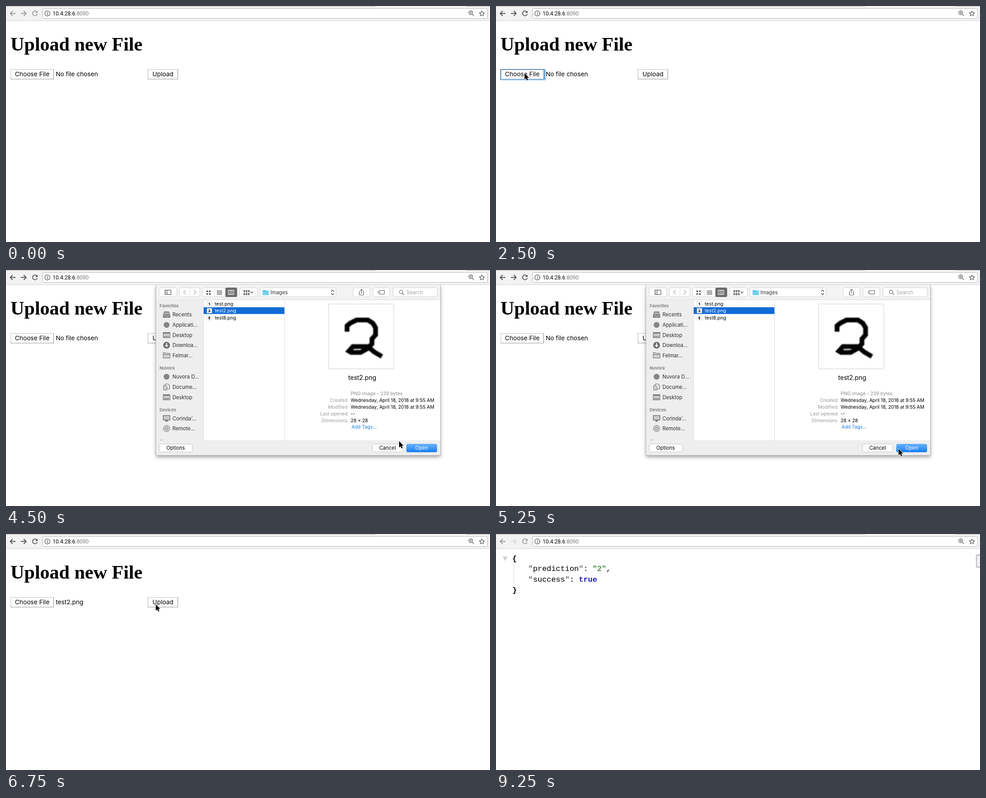
Animation, 1070 px wide and 524 px high, one loop 9.5 s. Source, as an HTML page:

```html
<!DOCTYPE html>
<html lang="en">
<head>
<meta charset="utf-8">
<title>File upload</title>
<style>
html, body { margin: 0; width: 100%; height: 100%; overflow: hidden; background: #fff; }
svg { display: block; width: 100%; height: 100%; }
text { font-family: Inter, sans-serif; white-space: pre; }
.serif { font-family: "Liberation Serif", serif; font-weight: 700; }
.url { font-family: Roboto, sans-serif; }
.mono { font-family: "Liberation Mono", monospace; }
.bold { font-weight: 700; }
</style>
</head>
<body>
<svg id="stage" viewBox="0 0 1070 524"></svg>
<script>
const LOOP = 9500, STEP = 250;

const rect = (x, y, w, h, fill, more = '') =>
  `<rect x="${x}" y="${y}" width="${w}" height="${h}" fill="${fill}" ${more}/>`;
const text = (x, y, s, size, more = '') =>
  `<text x="${x}" y="${y}" font-size="${size}" ${more}>${s}</text>`;
const line = (d, color, width = 1, more = '') =>
  `<path d="${d}" fill="none" stroke="${color}" stroke-width="${width}" ${more}/>`;
const shape = (d, fill, more = '') => `<path d="${d}" fill="${fill}" ${more}/>`;
const disc = (x, y, r, fill, more = '') => `<circle cx="${x}" cy="${y}" r="${r}" fill="${fill}" ${more}/>`;
const group = (id, body, more = '') => `<g id="${id}" ${more}>${body}</g>`;
const gray = c => `fill="${c}"`;
const end = 'text-anchor="end"', mid = 'text-anchor="middle"';

// Square web form button with a two pixel bevel
const webButton = (x, w, label) =>
  rect(x, 140, w, 23, '#a9a9a9') + rect(x, 140, w - 1, 22, '#d2d2d2') +
  rect(x + 1.5, 141.5, w - 3.5, 20, '#fff') + text(x + w / 2, 156.3, label, 13.7, mid);

const page = () =>
  text(10, 99, 'Upload new File', 42, 'class="serif"') +
  webButton(10, 96, 'Choose File') +
  group('ring',
    rect(9.5, 140, 100.5, 25, '#92c0f3', 'rx="1"') + rect(11.5, 142, 94, 20, '#fff') +
    `<path id="bevel" d="M10.5 163V140.8H106V162" fill="none" stroke-width="1.6"/>` +
    line('M11 162.4H106', '#6c8db5', .8) + text(58, 156.3, 'Choose File', 13.7, mid)) +
  `<text id="chosen" x="110" y="156.3" font-size="13.7"></text>` +
  webButton(313.5, 67, 'Upload');

const json = () => {
  const q = s => `<tspan fill="#444">"</tspan>${s}<tspan fill="#444">"</tspan>`;
  const row = (x, y, s, more = '') => text(x, y, s, 16.9, `class="mono ${more}"`);
  return shape('M14.5 50H25.5L20 60Z', '#d0d0d0') +
    row(36, 59.5, '{', 'bold') + row(36, 129.7, '}', 'bold') +
    line('M39.5 65V112', '#aaa', 1, 'stroke-dasharray="1.5 1.5"') +
    row(71.5, 82.3, q('prediction') + ': <tspan fill="#0b650b">"2"</tspan>,') +
    row(71.5, 106, q('success') + ': <tspan class="bold" fill="#1a1abd">true</tspan>') +
    rect(1062, 46.5, 14, 27, '#f0f0f0', 'rx="2" stroke="#999" stroke-width="1.3"');
};

const bar = () =>
  rect(0, 0, 1070, 33, '#f3f3f3') + rect(0, 32, 1070, 1, '#d4d4d4') +
  rect(0, 0, 816, 1, '#b0b0b0') + rect(1017, 0, 53, 1, '#b0b0b0') +
  rect(80.5, 5.5, 984, 22, '#fff', 'rx="2.5" stroke="#b9b9b9"') +
  group('back', line('M21 16.5H9.5M14.8 11L9.3 16.5L14.8 22', 'currentColor', 1.8)) +
  group('next', line('M33 16.5H44.5M39.2 11L44.7 16.5L39.2 22', 'currentColor', 1.8)) +
  group('reload', line('M68 13A5.2 5.2 0 1 0 69 18', 'currentColor', 1.8) +
    shape('M69.8 10.5V15.6H64.7Z', 'currentColor')) +
  disc(91.5, 16.5, 5.6, 'none', 'stroke="#555" stroke-width="1.3"') +
  rect(90.8, 15.6, 1.4, 4, '#555') + rect(90.8, 13, 1.4, 1.5, '#555') +
  text(103, 20.8, '10.4.28.6<tspan fill="#7a7a7a">:8090</tspan>', 12, 'class="url"') +
  disc(1027.5, 15, 4.2, 'none', 'stroke="#666" stroke-width="1.4"') +
  line('M1030.7 18.2L1034.5 22M1025.5 15H1029.5M1027.5 13V17', '#666', 1.4) +
  line('M1052 11L1053.6 14.7L1057.6 15.1L1054.6 17.8L1055.5 21.7L1052 19.6L1048.5 21.7L1049.4 17.8L1046.4 15.1L1050.4 14.7Z', '#555', 1.2);

const pill = (x, y, w, h, more = 'stroke="#d3d3d3"') =>
  rect(x + .5, y + .5, w - 1, h - 1, '#fff', `rx="3.5" ${more}`);

const ink = '#6b6b6b';
const icons = {
  tray: y => shape(`M349.5 ${y - 7}H360.5L363 ${y + 2}V${y + 7}H347V${y + 2}Z`, '#7d7d7d') +
    line(`M350 ${y - 4}H360M349.5 ${y - 1.5}H360.5M349 ${y + 2.5}H352.5L353.5 ${y + 4.5}H356.5L357.5 ${y + 2.5}H361`, '#eee'),
  dot: y => disc(355, y, 6.5, '#858585'),
  desk: y => rect(347.5, y - 5.5, 15, 11.5, '#c9c9c9', `stroke="${ink}"`) +
    rect(347, y - 6, 16, 2.5, ink) + line(`M349 ${y + 3.5}H361`, ink, 2, 'stroke-dasharray="2 1"'),
  down: y => disc(355, y, 7.5, ink) + line(`M355 ${y - 4.5}V${y + 1}`, '#fff', 2.4) +
    shape(`M350.8 ${y}H359.2L355 ${y + 4.8}Z`, '#fff'),
  folder: y => shape(`M347.5 ${y + 6}V${y - 6}H353L354.5 ${y - 4.5}H362.5V${y + 6}Z`, '#cfcfcf', `stroke="${ink}"`) +
    line(`M347.5 ${y - 2}H362.5`, ink),
  docs: y => line(`M352.5 ${y - 6.5}H358L361.5 ${y - 3}V${y + 4.5}H352.5Z`, ink, 1.2) +
    shape(`M348.5 ${y - 3.5}H353L356 ${y - .5}V${y + 7}H348.5Z`, '#cfcfcf', `stroke="${ink}"`),
  screen: y => rect(347.7, y - 6.3, 14.6, 10, '#c9c9c9', `stroke="${ink}" stroke-width="1.4"`) +
    shape(`M353.5 ${y + 4}H356.5L358.5 ${y + 7}H351.5Z`, ink),
  disk: y => disc(355, y, 7, '#dadada', `stroke="${ink}"`) +
    disc(355, y, 4, 'none', 'stroke="#999"') + disc(355, y, 2, '#fff', `stroke="${ink}"`)
};

const sidebar = () => {
  const heads = [['Favorites', 79.5], ['Nuvora', 217.5], ['Devices', 310], ['Shared', 380]];
  const items = [
    ['tray', 'Recents', 99], ['dot', 'Applicati...', 122], ['desk', 'Desktop', 144.5],
    ['down', 'Downloa...', 167], ['folder', 'Felmar...', 189.5], ['dot', 'Nuvora D...', 237],
    ['docs', 'Docume...', 259.5], ['desk', 'Desktop', 282.5], ['screen', 'Corinda’...', 329.5],
    ['disk', 'Remote...', 352]];
  return rect(332, 66, 105, 312, '#eeeeee') +
    heads.map(([s, y]) => text(339.5, y + 3.5, s, 9.5, 'font-weight="600" fill="#777"')).join('') +
    items.map(([icon, s, y]) => icons[icon](y) + text(368, y + 4, s, 11.2, gray('#2b2b2b'))).join('');
};

const tools = () => {
  let dots = '';
  for (const dx of [443, 449]) for (const dy of [45.5, 51.5])
    dots += rect(dx, dy, 3.6, 3.6, '#555', 'rx=".6"');
  for (const dx of [525, 530, 535]) for (const dy of [45, 51.5])
    dots += rect(dx, dy, 3.6, 3.2, '#555', 'rx=".5"') + rect(dx, dy + 4, 3.6, .9, '#777');
  return rect(332, 33, 628, 33, '#f3f3f3') + rect(332, 65.5, 628, 1, '#d2d2d2') +
    [[338, 40], [383, 46], [434, 77], [516, 40], [561, 169], [767, 38], [811, 38], [855, 99]]
      .map(([x, w]) => pill(x, 39, w, 21)).join('') +
    rect(351.5, 44.5, 13, 10, '#fff', 'stroke="#555" stroke-width="1.2"') +
    line('M356.5 44V55M353 47H355M353 49.5H355M353 52H355', '#555') +
    line('M406.5 39V60M460.5 39V60', '#d9d9d9') +
    line('M397 45L392.5 49.5L397 54M415.5 45L420 49.5L415.5 54', '#aaa', 1.3) +
    rect(485, 39, 26, 21, ink, 'rx="3"') + rect(491.5, 45, 12, 9.5, 'none', 'stroke="#fff" stroke-width="1.2"') +
    line('M495.5 45V54M499.5 45V54', '#fff', 1.2) + dots +
    line('M466 45.5H478M466 48.3H478M466 51.1H478M466 53.9H478', '#555', 1.2) +
    line('M540.5 48L543.5 51L546.5 48', '#555', 1.4) +
    shape('M567.5 56V44.5H572.5L574 46H581V56Z', '#55bde8') + rect(567.5, 47.5, 13.5, 8.5, '#76d0f3') +
    text(584.5, 53.8, 'Images', 11.2, gray('#333')) +
    line('M719 47.5L722 44.5L725 47.5M719 52L722 55L725 52', '#444', 1.4) +
    group('actions', line('M783 48H781.5V55.5H790.5V48H789M786 52V43M783.5 45.5L786 43L788.5 45.5', 'currentColor', 1.1) +
      line('M822.5 49.5L826.5 45.5H836.5V53.5H826.5Z', 'currentColor', 1.1) + disc(827, 49.5, .8, 'currentColor')) +
    disc(873.5, 48.5, 3.8, 'none', 'stroke="#666" stroke-width="1.2"') +
    line('M876.3 51.3L880 55', '#666', 1.4) + text(885, 53.8, 'Search', 11.2, gray('#a5a5a5'));
};

const TWO = 'M754 137V124L761 118L775 111H800L811 118L817 128V144L809 153V164L798 175L784 183H763L758 180L767 170H800L814 182L831 192';

const files = () => {
  const rows = ['test.png', 'test2.png', 'test8.png'].map((s, i) => [s, 75 + 15.6 * i]);
  const glyphs = ['M451 -2.5L448.5 -1L451 1L449 3', 'M447.5 -1.5L450 -2.5L451 0L448 2H452', 'M449.5 -2.8L451 -1.3L448 1.3L449.5 2.8L451 1.3L448 -1.3Z'];
  return group('selected', rect(437, 82.7, 178.5, 15, '#116bd6')) +
    group('generic', rows.map(([, y]) =>
      shape(`M445.5 ${y - 6}H451L454 ${y - 3}V${y + 6}H445.5Z`, '#fdfdfd', 'stroke="#c4c4c4"') +
      rect(446.5, y - 1, 6, 4, '#6e8090') + disc(448.5, y + .5, 1, '#c8d6e0')).join('')) +
    group('thumbs', rows.map(([, y], i) => rect(444.5, y - 5.5, 10.5, 10.5, '#fff', 'stroke="#cfcfcf"') +
      line(glyphs[i], '#222', 1.3, `transform="translate(0 ${y})"`)).join('')) +
    rows.map(([s, y], i) => text(461.5, y + 3.8, s, 10.6, `id="file${i}"`)).join('');
};

const preview = () => {
  const date = 'Wednesday, April 18, 2018 at 9:55 AM';
  const facts = [['Created', date], ['Modified', date], ['Last opened', '--'], ['Dimensions', '28 × 28']];
  return rect(713.5, 75.5, 144, 144, '#fff', 'stroke="#d0d0d0"') +
    line(TWO, '#000', 10.5, 'filter="url(#soft)"') +
    text(787.5, 243.7, 'test2.png', 13.9, mid) +
    text(762, 277.5, 'PNG image - 239 bytes', 10.4, gray('#8c8c8c')) +
    facts.map(([k, v], i) => text(755, 292.5 + 15 * i, k, 10.4, end + ' fill="#999"') +
      text(762, 292.5 + 15 * i, v, 10.4)).join('') +
    text(764, 352.3, 'Add Tags...', 10.4, gray('#1a7be0'));
};

const dialog = () =>
  rect(332, 33, 628, 378, '#fff', 'filter="url(#shadow)"') + tools() + sidebar() +
  line('M437 66V378M615.5 66V378', '#dcdcdc') + files() + group('preview', preview()) +
  rect(332, 378, 628, 33, '#eeeeee') +
  pill(338.5, 386, 74, 18.5, 'stroke="#c6c6c6"') + text(375, 399, 'Options', 11.2, mid) +
  pill(810, 386, 68, 18.5, 'stroke="#c6c6c6"') + text(843.5, 399, 'Cancel', 11.2, mid) +
  rect(885.5, 386.5, 67, 18, '#f4f4f4', 'rx="3.5" stroke="#d8d8d8"') +
  group('ready', rect(885, 386, 68, 18.5, 'url(#blue)', 'rx="3.5"')) +
  text(919, 399, 'Open', 11.2, mid + ' id="open"') +
  rect(331.5, 32.5, 629, 379, 'none', 'stroke="#b5b5b5"');

const stage = document.getElementById('stage');
stage.innerHTML = `<defs>
  <filter id="soft"><feGaussianBlur stdDeviation="1.1"/></filter>
  <filter id="shadow" x="-10%" y="-10%" width="120%" height="120%"><feDropShadow dx="0" dy="4" stdDeviation="4.5" flood-opacity=".4"/></filter>
  <linearGradient id="blue" x2="0" y2="1"><stop stop-color="#6bb3fa"/><stop offset="1" stop-color="#137cf5"/></linearGradient>
  </defs>` +
  group('page', page()) + group('json', json()) + group('dialog', dialog()) + bar() +
  group('cursor', shape('M0 0V14.2L3.2 11.2L5.4 16.2L7.9 15.1L5.7 10.3H10Z', '#000',
    'stroke="#fff" stroke-width="1.6" paint-order="stroke" stroke-linejoin="round"'));

const $ = id => document.getElementById(id);
const show = (id, on) => $(id).setAttribute('display', on ? 'inline' : 'none');
const paint = (id, c) => $(id).setAttribute('fill', c);

// time, x, y of the pointer
const path = [
  [750, 420, 60], [1000, 290, 130], [1250, 150, 160], [1500, 63, 149], [2500, 63, 149],
  [3000, 197, 147], [3500, 490, 87], [4000, 490, 87], [4500, 869, 380], [4750, 890, 397],
  [5750, 890, 397], [6500, 331, 156], [9000, 331, 156]];

function pointer(t) {
  const i = Math.max(1, path.findIndex(p => p[0] > t));
  const [a, b] = [path[i - 1], path[i]];
  const k = (t - a[0]) / (b[0] - a[0]);
  return [a[1] + (b[1] - a[1]) * k, a[2] + (b[2] - a[2]) * k];
}

function draw(now) {
  const t = Math.floor((now % LOOP) / STEP) * STEP;
  const within = (a, b) => t >= a && t < b;
  const result = t >= 7000, active = within(1000, 9000), picked = t >= 3750;

  show('page', !result);
  show('json', result);
  show('ring', within(2500, 3250) || within(5750, 6500));
  $('bevel').setAttribute('stroke', t < 5000 ? '#58779f' : '#92bdec');
  $('chosen').textContent = t < 5750 ? 'No file chosen' : 'test2.png';

  show('dialog', within(2750, 5750));
  const lift = t === 2750 || t === 5500 ? -79 : 0;
  $('dialog').setAttribute('transform', `translate(0 ${lift})`);
  for (const id of ['selected', 'preview', 'ready']) show(id, picked);
  show('generic', t < 3250);
  show('thumbs', t >= 3250);
  paint('file1', picked ? '#fff' : '#000');
  paint('open', picked ? '#fff' : '#b3b3b3');
  $('actions').style.color = picked ? '#555' : '#b0b0b0';

  const tone = active ? '#555' : '#999';
  $('back').style.color = $('reload').style.color = tone;
  $('next').style.color = result ? '#dadada' : tone;

  const seen = within(750, 9000);
  show('cursor', seen);
  if (seen) $('cursor').setAttribute('transform', `translate(${pointer(t)})`);
}

const start = performance.now();
function frame() {
  draw(performance.now() - start);
  requestAnimationFrame(frame);
}
frame();
</script>
</body>
</html>
```
